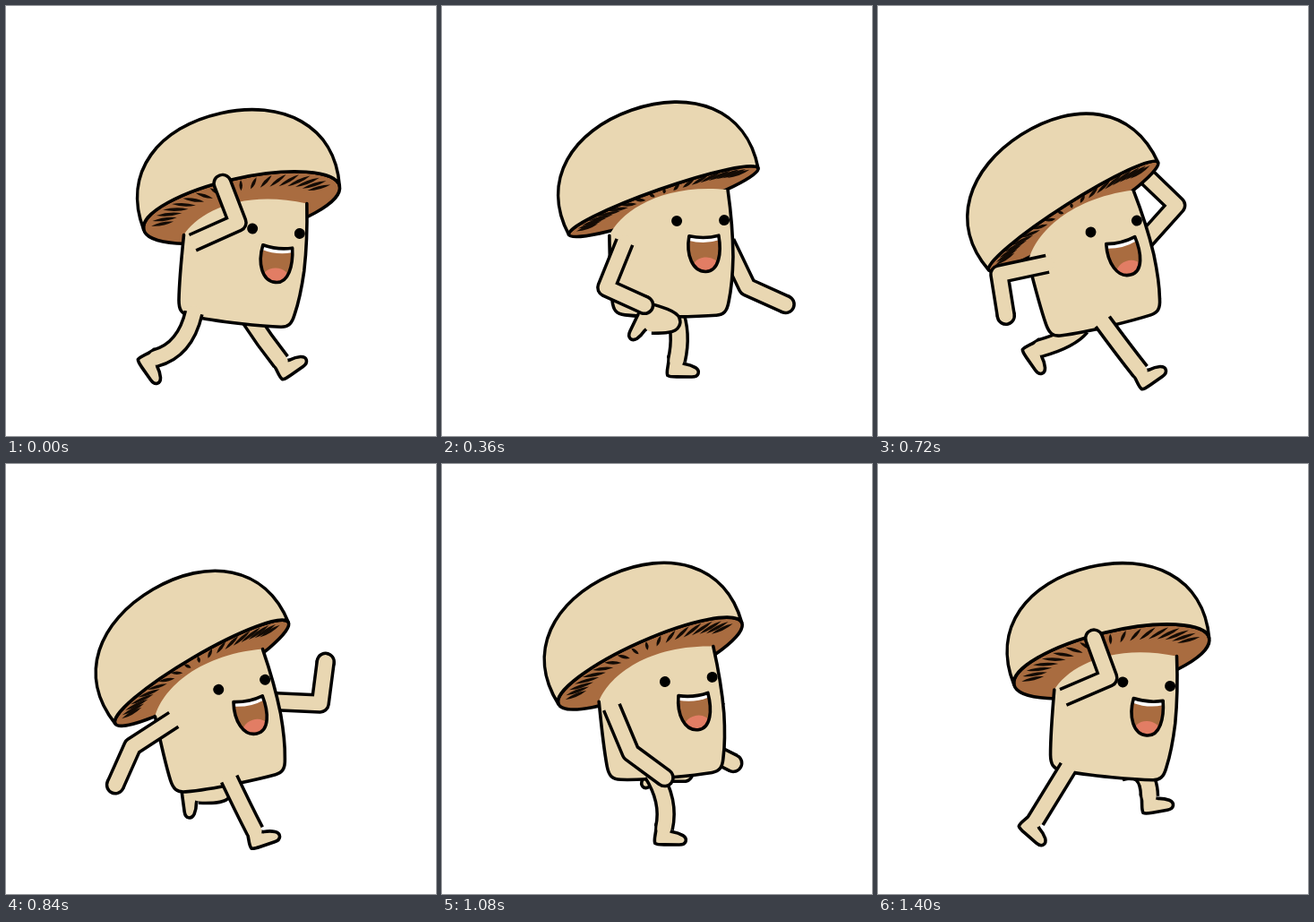
An HTML page with a canvas that plays this animation: 480x480 px, repeating every 1.44 s.

```html
<!DOCTYPE html>
<html>
<head>
<meta charset="utf-8">
<title>Running mushroom</title>
<style>
html, body { margin: 0; width: 100%; height: 100%; overflow: hidden; background: #fff; }
canvas { display: block; }
</style>
</head>
<body>
<canvas id="stage" width="480" height="480"></canvas>
<script>
const LOOP = 1440, STEP = 40, RAD = Math.PI / 180;
const SKIN = '#e9d7b2', BROWN = '#a96c40', TONGUE = '#e27d64', INK = '#000';
const LINE = 3.6;
const ctx = document.getElementById('stage').getContext('2d');

// Smooth periodic curve through the given values.
function track(times, values) {
  const n = times.length;
  const at = i => {
    const k = (i + n) % n;
    return [times[k] + LOOP * Math.floor(i / n), values[k]];
  };
  const slope = i => {
    const [t0, v0] = at(i - 1), [t1, v1] = at(i + 1);
    return (v1 - v0) / (t1 - t0);
  };
  return time => {
    const t = time % LOOP;
    let i = n - 1;
    while (times[i] > t) i--;
    const [t0, v0] = at(i), [t1, v1] = at(i + 1);
    const d = t1 - t0, u = (t - t0) / d, w = 1 - u;
    return w * w * (1 + 2 * u) * v0 + u * u * (3 - 2 * u) * v1 +
      d * u * w * (w * slope(i) - u * slope(i + 1));
  };
}

const KEYS = [0, 200, 520, 720, 960, 1200, 1400];
const HOPS = [0, 200, 470, 520, 720, 960, 1200, 1250, 1400];
const STEPS = [0, 200, 520, 680, 720, 960, 1200, 1400];

const body = {
  x: track(KEYS, [301.5, 289.5, 286, 263.2, 268.2, 284, 299.7]),
  y: track(HOPS, [251.2, 244.5, 234, 222.2, 246, 242.5, 235.5, 222, 245.7]),
  tilt: track(KEYS, [5.9, -1.1, -1.6, -14.1, -7.6, -3.2, 4.9]),
  gape: track(KEYS, [33, 22, 9, 15, 24, 28, 33])
};
const nearArm = {
  upper: track(KEYS, [-30, 50, 166, 182, 122, 23, -28]),
  elbow: track(KEYS, [-87, -84, -91, -87, 8, -83, -87])
};
const farArm = {
  upper: track(KEYS, [182, 125, 8, -34, 77, 153, 181]),
  elbow: track(KEYS, [-87, 0, -93, -88, -84, -91, -88])
};
const leg = {
  hip: track(STEPS, [-82, -71, -54, -40, -38, -37, -66, -79]),
  kneeX: track(STEPS, [200, 270, 284, 288, 274, 258, 246, 192]),
  kneeY: track(STEPS, [384, 376, 338, 345, 384, 376, 377, 372]),
  ankleX: track(STEPS, [167, 221, 246, 289, 293, 261, 231, 176]),
  ankleY: track(STEPS, [393, 372, 348, 382, 408, 406, 406, 398]),
  foot: track(STEPS, [55, 95, 110, -10, -35, 0, 2, 41])
};

const BODY = new Path2D('M-102 15C-90-10-45-43 31-34C34-10 36 15 35.7 41C35 60 33 78 30 91C28 102 24 105.5 16 106C0 107-55 108-86 104C-96 103-99 98-100 88C-102 65-102 40-102 15Z');
const SIDES = new Path2D('M31-34C34-10 36 15 35.7 41C35 60 33 78 30 91C28 102 24 105.5 16 106C0 107-55 108-86 104C-96 103-99 98-100 88C-102 65-102 40-102 15');
const MOUTH = new Path2D('M-13 17Q4 21 20 17C23 36 20 57 5 57C-10 57-17 38-13 17Z');
const TEETH = new Path2D('M-14 15H22L20 22Q4 27-14 22Z');
const FOOT = new Path2D('M-9-4C-8 4-12 12-10 17Q-8 18.5 0 18.5H17C25 18.5 27 12 21 8Q16 5 9 4Z');

function paint(path, fill) {
  ctx.fillStyle = fill;
  ctx.fill(path);
  ctx.stroke(path);
}

function disc(x, y, r, color) {
  ctx.fillStyle = color;
  ctx.beginPath();
  ctx.arc(x, y, r, 0, 7);
  ctx.fill();
}

function tube(path, width, color, cap) {
  ctx.save();
  ctx.lineWidth = width;
  ctx.strokeStyle = color;
  ctx.lineCap = cap;
  ctx.stroke(path);
  ctx.restore();
}

function inBody(t, draw) {
  ctx.save();
  ctx.translate(body.x(t), body.y(t));
  ctx.rotate(body.tilt(t) * RAD);
  draw();
  ctx.restore();
}

function drawArm(t, arm, x, y) {
  const a = arm.upper(t) * RAD, b = a + arm.elbow(t) * RAD;
  const ex = x + 55 * Math.cos(a), ey = y + 55 * Math.sin(a);
  const hx = ex + 47 * Math.cos(b), hy = ey + 47 * Math.sin(b);
  const path = new Path2D(`M${x} ${y}L${ex} ${ey}L${hx} ${hy}`);
  tube(path, 22.5, INK, 'butt');
  disc(hx, hy, 11.25, INK);
  tube(path, 15.5, SKIN, 'round');
}

function drawLeg(t, phase, hipShift, dx, dy) {
  const p = t + phase, tilt = body.tilt(t) * RAD;
  const lx = leg.hip(p) + hipShift, ly = 100;
  const hx = body.x(t) + lx * Math.cos(tilt) - ly * Math.sin(tilt);
  const hy = body.y(t) + lx * Math.sin(tilt) + ly * Math.cos(tilt);
  const ax = leg.ankleX(p) + dx, ay = leg.ankleY(p) + dy;
  const path = new Path2D(`M${hx} ${hy}Q${leg.kneeX(p) + dx} ${leg.kneeY(p) + dy} ${ax} ${ay}`);
  tube(path, 22.5, INK, 'butt');
  ctx.save();
  ctx.translate(ax, ay);
  ctx.rotate(leg.foot(p) * RAD);
  paint(FOOT, SKIN);
  ctx.restore();
  tube(path, 15.5, SKIN, 'round');
}

function inCap(draw) {
  ctx.save();
  ctx.translate(-41, -22);
  ctx.rotate(-18.4 * RAD);
  draw();
  ctx.restore();
}

function drawGills(gape) {
  const under = new Path2D();
  under.ellipse(0, 0, 112, gape, 0, 0, 7);
  paint(under, BROWN);
  ctx.fillStyle = '#130b05';
  const count = 18;
  for (let i = 0; i < count; i++) {
    const a = Math.PI * (0.99 + (i + 0.5) / count);
    const c = 112 * Math.cos(a), s = gape * Math.sin(a);
    const k0 = 0.92, k1 = 0.7 - 0.14 * Math.abs(Math.sin(a)), k = (k0 + k1) / 2;
    const len = Math.hypot(c, s), nx = -s / len * 3.6, ny = c / len * 3.6;
    ctx.beginPath();
    ctx.moveTo(c * k0, s * k0);
    ctx.quadraticCurveTo(c * k + nx, s * k + ny, c * k1, s * k1);
    ctx.quadraticCurveTo(c * k - nx, s * k - ny, c * k0, s * k0);
    ctx.fill();
  }
}

function drawDome(gape) {
  const dome = new Path2D('M-112 0C-122-68-70-108 0-108C70-108 122-68 112 0');
  dome.ellipse(0, 0, 112, gape, 0, 0, Math.PI, true);
  dome.closePath();
  paint(dome, SKIN);
}

function drawFace() {
  disc(-26.5, 0, 6, INK);
  disc(26.5, 0, 6, INK);
  ctx.save();
  ctx.clip(MOUTH);
  ctx.fillStyle = BROWN;
  ctx.fill(MOUTH);
  ctx.fillStyle = TONGUE;
  ctx.beginPath();
  ctx.ellipse(5, 55, 16, 14, -0.1, 0, 7);
  ctx.fill();
  ctx.fillStyle = '#fff';
  ctx.fill(TEETH);
  ctx.restore();
  ctx.stroke(MOUTH);
}

function draw(t) {
  ctx.fillStyle = '#fff';
  ctx.fillRect(0, 0, 480, 480);
  ctx.lineWidth = LINE;
  ctx.strokeStyle = INK;
  ctx.lineCap = ctx.lineJoin = 'round';
  const gape = body.gape(t);

  drawLeg(t, LOOP / 2, 19, 14, -11);
  inBody(t, () => {
    drawArm(t, farArm, 28, 25);
    inCap(() => drawGills(gape));
    ctx.fillStyle = SKIN;
    ctx.fill(BODY);
    ctx.stroke(SIDES);
    inCap(() => drawDome(gape));
    drawFace();
  });
  drawLeg(t, 0, 0, 0, 0);
  inBody(t, () => {
    drawArm(t, nearArm, -87 - 5 * Math.cos(nearArm.upper(t) * RAD), 22.5);
  });
}

const start = performance.now();
function tick() {
  const t = (performance.now() - start) % LOOP;
  draw(Math.floor(t / STEP) * STEP);
  requestAnimationFrame(tick);
}
tick();
</script>
</body>
</html>
```
